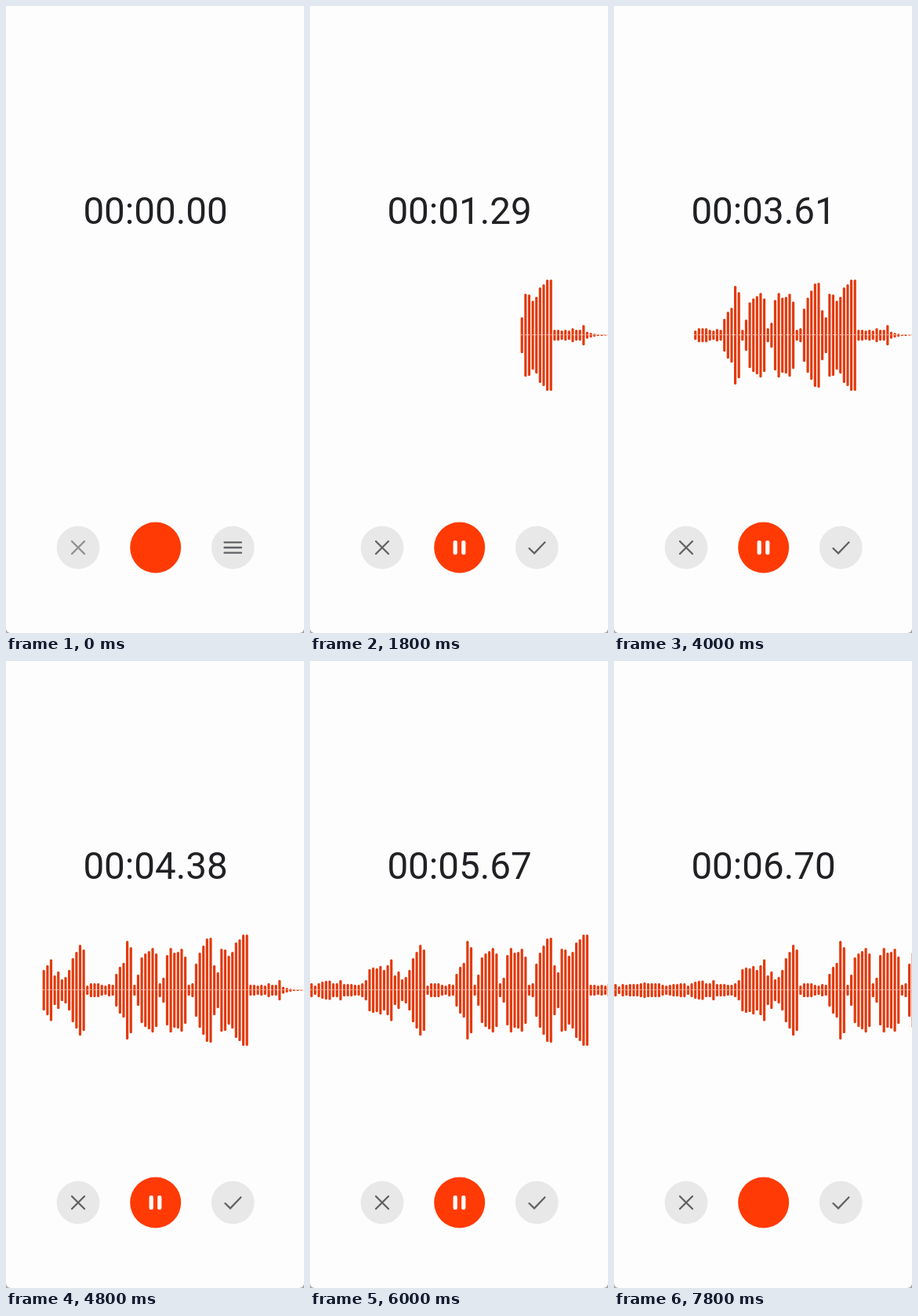
Recreate the animation shown at these times as an HTML page. Size 380 by 800 pixels, loop 8 s.

```html
<!DOCTYPE html>
<html lang="en">
<head>
<meta charset="utf-8">
<title>Voice recorder</title>
<style>
  html, body { margin: 0; width: 100%; height: 100%; overflow: hidden; background: #a6a6a6; }
  svg { display: block; width: 380px; height: 800px; }
  #time { font: 47.5px Roboto, sans-serif; fill: #202124; text-anchor: middle; }
  #bars { fill: #e23a0c; }
  .disc { fill: #e8e8e8; }
  .icon { fill: none; stroke: #606164; stroke-width: 2.3; stroke-linecap: round; }
  .idle .cross { stroke: #8f8f91; }
  .idle .check, .recording .menu, svg:not(.recording) .pause { display: none; }
  .stopped .menu { display: none; }
</style>
</head>
<body>
<svg viewBox="0 0 380 800" class="idle">
  <rect y="-20" width="380" height="820" rx="6" fill="#fdfdfd"/>
  <text id="time" x="190.5" y="278">00:00.00</text>
  <g id="bars"></g>
  <line id="axis" x2="380" y1="419.5" y2="419.5" stroke="#f6bda9" stroke-dasharray="2 1"/>

  <circle class="disc" cx="92" cy="691" r="27.4"/>
  <path class="icon cross" d="M84 683l16 16m0-16l-16 16"/>

  <circle cx="190.7" cy="691" r="32.5" fill="#ff3a05"/>
  <g class="pause" fill="#fff">
    <rect x="182.6" y="682" width="5.2" height="18" rx="2"/>
    <rect x="193.2" y="682" width="5.2" height="18" rx="2"/>
  </g>

  <circle class="disc" cx="289.3" cy="691" r="27.4"/>
  <path class="icon menu" d="M278.5 684.3h21.5m-21.5 6.7h21.5m-21.5 6.7h21.5"/>
  <path class="icon check" d="M279.5 692l6.5 6.3 13.5-14"/>
</svg>
<script>
  const LOOP = 8000, TICK = 250;
  const STEP = 4.625, FIRST_X = 376.6, CAPACITY = 82, MID_Y = 420;
  const STOP_TICK = 29;

  // Half heights of the recorded levels, oldest first.
  const levels = [
    0.5, 1, 1, 2, 3, 4.5, 13, 7, 7, 9, 6, 7, 6, 7, 7, 71, 71, 65, 61, 49,
    44, 52, 53, 23, 32, 67, 66, 57, 48, 34, 9, 7, 43, 53, 49, 48, 54, 45, 16, 9,
    47, 54, 50, 47, 42, 20, 7, 55, 63, 35, 30, 21, 7, 8, 6, 7, 9, 9, 9, 6,
    52, 58, 49, 41, 26, 17, 14, 24, 19, 39.5, 32, 26, 31, 28, 29, 27, 13, 9, 7, 7,
    8, 8, 8, 13, 9, 9, 12.5, 12, 11, 9, 6, 9, 9, 8, 8, 7, 6, 7, 9, 9,
    9, 9, 10, 9, 8, 8, 8, 7, 8, 5, 8
  ];

  const svg = document.querySelector('svg');
  const time = document.getElementById('time');
  const group = document.getElementById('bars');
  const axis = document.getElementById('axis');

  const barX = n => FIRST_X - STEP * n;

  const bars = levels.map((half, n) => {
    const bar = document.createElementNS(svg.namespaceURI, 'rect');
    const attrs = {
      x: barX(n) - 1.6, y: MID_Y - half, width: 3.2, height: 2 * half, rx: Math.min(1.6, half)
    };
    for (const name in attrs) bar.setAttribute(name, attrs[name]);
    return group.appendChild(bar);
  });

  function clock(seconds) {
    return '00:' + seconds.toFixed(2).padStart(5, '0');
  }

  function barCount(tick) {
    const catchUp = Math.min(2, Math.max(0, tick - 24));
    return Math.max(0, Math.min(levels.length, 4 * (tick - 1) + catchUp));
  }

  function draw(tick) {
    const count = barCount(tick);
    const shift = Math.max(0, count - CAPACITY) * STEP;
    svg.setAttribute('class', tick < 1 ? 'idle' : tick < STOP_TICK ? 'recording' : 'stopped');
    time.textContent = clock(0.2578 * Math.min(26, Math.max(0, tick - 2)));
    bars.forEach((bar, n) => bar.setAttribute('visibility', n < count ? 'visible' : 'hidden'));
    group.setAttribute('transform', `translate(${shift} 0)`);
    axis.setAttribute('x1', count ? barX(count - 1) + shift - 1.6 : 380);
  }

  const start = performance.now();
  let shown = -1;

  function frame() {
    const tick = Math.floor(((performance.now() - start) % LOOP) / TICK);
    if (tick !== shown) draw(shown = tick);
    requestAnimationFrame(frame);
  }
  frame();
</script>
</body>
</html>
```
